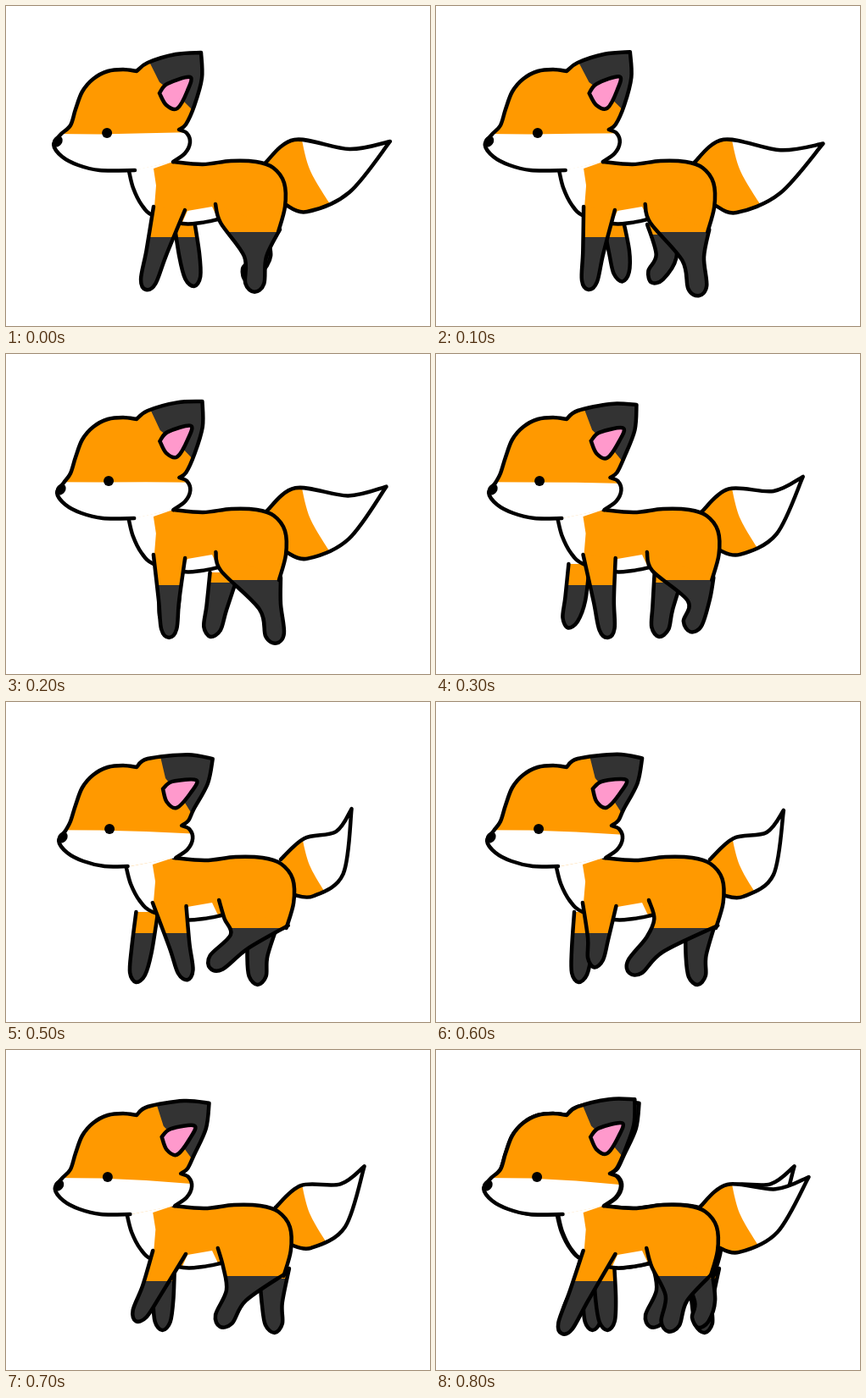
Recreate the animation shown at these times as an HTML page with a canvas. Size 500 by 378 pixels, loop 0.9 s.

```html
<!DOCTYPE html>
<html lang="en">
<head>
<meta charset="utf-8">
<title>Walking fox</title>
<style>
  html, body { margin: 0; width: 100%; height: 100%; overflow: hidden; background: #fff; }
  canvas { display: block; width: 500px; height: 378px; }
</style>
</head>
<body>
<canvas id="stage" width="500" height="378"></canvas>
<script>
const ctx = document.getElementById('stage').getContext('2d');
const ORANGE = '#ff9900', DARK = '#333333', PINK = '#ff99cc', WHITE = '#ffffff', INK = '#000000';
const STEP = 100, STEPS = 9;

const points = text => text.split(' ').map(pair => pair.split(',').map(Number));
const mix = (a, b, t) => a + (b - a) * t;
const mixPoints = (from, to, t) => from.map((p, i) => p.map((v, axis) => mix(v, to[i][axis], t)));

// Resting shapes; the walk bends them by rule.
const crown = points('76,141 82,122 90,101 103,86 120,77 138,75 154,77');
const jaw = points('110,194 85,188 66,178 56,164 64,152');
const cheek = points('204,146 213,150 217,161 211,174 197,184');
const earFront = points('200,57 230,55');
const earBack = points('230,55 231,85 222,118');
const earCut = points('168,64 181,90 210,113 220,123');
const innerEar = points('181,103 190,92 217,84 214,100 202,121 189,117');
const spine = points('197,184 232,187 265,183 295,184 315,191 328,209 329,237 321,267');
const chest = points('145,195 150,215 160,235 174,248 208,257 230,256 250,252');
const bib = points('197,184 174,192 177,212 174,250 120,260 120,180');
const belly = points('205,262 214,242 243,237 252,256');
const tailOut = points('305,186 340,158 405,169 453,160 405,220 355,243 330,235');
const tailUp = points('323,186 351,161 390,154 410,128 398,204 362,230 338,228');
const tailCut = points('348,154 359,195 386,240');

// A paw is on the ground from step `start` for `stance` steps, moving from `front` to `back`.
// The hip follows it by the share `slide`; `left` and `right` are offsets from the hip.
const legs = {
  farFront: {
    hip: [190, 248], slide: 0.6, left: points('-12,0'), right: points('12,0'),
    front: 140, back: 228, ground: 331, rise: 0, start: 4, stance: 5.3, bow: -0.25,
    lift: 10, bend: 3, shin: 12, paw: 9, sock: 273
  },
  farHind: {
    hip: [295, 258], slide: 0.7, left: points('-17,0'), right: points('17,0'),
    front: 241, back: 318, ground: 334, rise: 0, start: 2, stance: 5.2, bow: 0.6,
    lift: 10, bend: 16, shin: 12, paw: 10, sock: 270
  },
  nearFront: {
    hip: [192, 239], slide: 0, left: points('-18,-2'), right: points('19,2'),
    front: 143, back: 216, ground: 335, rise: 0, start: 7.7, stance: 6, bow: 0.5,
    lift: 22, bend: 2, shin: 12, paw: 9, sock: 273
  },
  nearHind: {
    hip: [295, 245], slide: 0, left: points('-48,-11 -42,11'), right: points('28,19'),
    front: 228, back: 320, ground: 345, rise: 0.27, start: 6, stance: 4.7, bow: 0.3,
    lift: 14, bend: 15, shin: 13, paw: 11, sock: 267
  }
};

// Smooth curve through the points, continuing the current path.
function curve(path, pts) {
  path.lineTo(...pts[0]);
  for (let i = 0; i < pts.length - 1; i++) {
    const a = pts[i - 1] || pts[i], b = pts[i], c = pts[i + 1], d = pts[i + 2] || c;
    path.bezierCurveTo(b[0] + (c[0] - a[0]) / 6, b[1] + (c[1] - a[1]) / 6,
      c[0] - (d[0] - b[0]) / 6, c[1] - (d[1] - b[1]) / 6, c[0], c[1]);
  }
  return path;
}

const outline = (...runs) => runs.reduce(curve, new Path2D());

function polygon(...pts) {
  const path = new Path2D();
  pts.forEach(p => path.lineTo(...p));
  return path;
}

function fill(path, color) {
  ctx.fillStyle = color;
  ctx.fill(path);
}

function patch(mask, shape, color) {
  ctx.save();
  ctx.clip(mask);
  fill(shape, color);
  ctx.restore();
}

function dot(x, y, rx, ry, angle = 0) {
  const path = new Path2D();
  path.ellipse(x, y, rx, ry, angle, 0, Math.PI * 2);
  fill(path, INK);
}

// Everything that sways depends on the step alone.
function swayAt(step) {
  const wave = shift => Math.cos(2 * Math.PI * (step + shift) / STEPS);
  const lag = (0.85 - wave(-0.8)) / 1.73;
  const tilt = 0.22 * lag;
  return {
    lag,
    nod: 3.5 * (1 - wave(0.5)),
    muzzle: 149 + 1.35 * step,
    stretch: ([x, y]) => [x + 9 * lag * (x - 190) / 130, y],
    turnEar([x, y]) {
      const dx = x - 185, dy = y - 120;
      return [185 + dx * Math.cos(tilt) - dy * Math.sin(tilt), 120 + dx * Math.sin(tilt) + dy * Math.cos(tilt)];
    }
  };
}

function pawAt({ front, back, ground, rise, start, stance, bow, lift }, step) {
  const since = (step - start + STEPS) % STEPS;
  let along, air = 0;
  if (since < stance) {
    const u = since / stance;
    along = u + bow * u * (1 - u);
  } else {
    const u = (since - stance) / (STEPS - stance);
    along = 1 - u * u * (3 - 2 * u);
    air = Math.sin(Math.PI * u);
  }
  const x = mix(front, back, along);
  return { air, at: [x, ground - rise * (back - x) - lift * air] };
}

function direction(from, to) {
  const dx = to[0] - from[0], dy = to[1] - from[1], length = Math.hypot(dx, dy);
  return [dx / length, dy / length];
}

// Point at `side` pixels across and `along` pixels down a limb heading in direction d.
const beside = ([x, y], d, side, along = 0) => [x + d[1] * side + d[0] * along, y - d[0] * side + d[1] * along];

function drawLeg(leg, step, { stretch }) {
  const { at: paw, air } = pawAt(leg, step);
  const hip = [mix(leg.hip[0], paw[0], leg.slide), leg.hip[1]];
  const shin = [mix(hip[0], paw[0], 0.55) + leg.bend * air, mix(hip[1], paw[1], 0.55)];
  const thighWay = direction(hip, paw), pawWay = direction(shin, paw);
  const fromHip = ([x, y]) => stretch([hip[0] + x, hip[1] + y]);
  const shape = outline([
    ...leg.left.map(fromHip),
    beside(shin, thighWay, -leg.shin),
    beside(paw, pawWay, -leg.paw, -10),
    paw,
    beside(paw, pawWay, leg.paw, -10),
    beside(shin, thighWay, leg.shin),
    ...leg.right.map(fromHip)
  ]);
  fill(shape, ORANGE);
  patch(shape, polygon([0, leg.sock], [500, leg.sock], [500, 378], [0, 378]), DARK);
  ctx.stroke(shape);
}

function drawTail({ lag }) {
  const tail = mixPoints(tailOut, tailUp, lag);
  const shape = outline(tail.slice(0, 4), tail.slice(3));
  const tip = outline(tailCut);
  [[480, 260], [480, 100], [348, 100]].forEach(p => tip.lineTo(...p));
  fill(shape, ORANGE);
  patch(shape, tip, WHITE);
  ctx.stroke(shape);
}

function drawBody({ stretch }) {
  const under = chest.map(stretch);
  const shape = outline(spine.map(stretch), [...under].reverse());
  fill(shape, ORANGE);
  patch(shape, polygon(...bib.map(stretch)), WHITE);
  patch(shape, polygon(...belly), WHITE);
  ctx.stroke(outline(under));
}

function drawHead({ lag, nod, muzzle, turnEar }) {
  const chin = [152 - 8 * lag, 194];
  const snout = jaw.map(([x, y]) => [x + nod, y]);
  const [tipFront, tipBack, cut, inner] = [earFront, earBack, earCut, innerEar].map(part => part.map(turnEar));
  const nape = mixPoints(cheek, cheek.map(([x, y]) => [x + 3, y]), lag);
  const shape = outline([chin, ...snout, ...crown], [crown[6], [167, 67], ...tipFront],
    [...tipBack, [mix(212, 215, lag), 140], nape[0]], nape);
  fill(shape, WHITE);
  patch(shape, polygon([40, 151], [110, 151.5], [165, mix(151, muzzle, 0.4)], [225, muzzle], [280, muzzle], [280, 30], [40, 30]), ORANGE);
  patch(shape, polygon(...cut, [270, cut[3][1] + 4], [270, 40], [cut[0][0] - 4, 40]), DARK);
  ctx.stroke(shape);

  const ear = outline([...inner, inner[0]]);
  fill(ear, PINK);
  ctx.stroke(ear);
  dot(119 + nod / 2, 150, 6, 6);
  dot(60.5 + nod, 160, 5.5, 7, 0.6);
}

function drawFox(step) {
  const sway = swayAt(step);
  drawTail(sway);
  drawLeg(legs.farFront, step, sway);
  drawLeg(legs.farHind, step, sway);
  drawBody(sway);
  drawLeg(legs.nearFront, step, sway);
  drawLeg(legs.nearHind, step, sway);
  ctx.stroke(outline(spine.map(sway.stretch)));
  drawHead(sway);
}

function tick() {
  const step = Math.floor(performance.now() / STEP) % STEPS;
  ctx.clearRect(0, 0, 500, 378);
  ctx.strokeStyle = INK;
  ctx.lineWidth = 4.5;
  ctx.lineCap = ctx.lineJoin = 'round';
  // The last step leaves the one before it showing behind.
  if (step === STEPS - 1) drawFox(step - 1);
  drawFox(step);
  requestAnimationFrame(tick);
}
tick();
</script>
</body>
</html>
```
